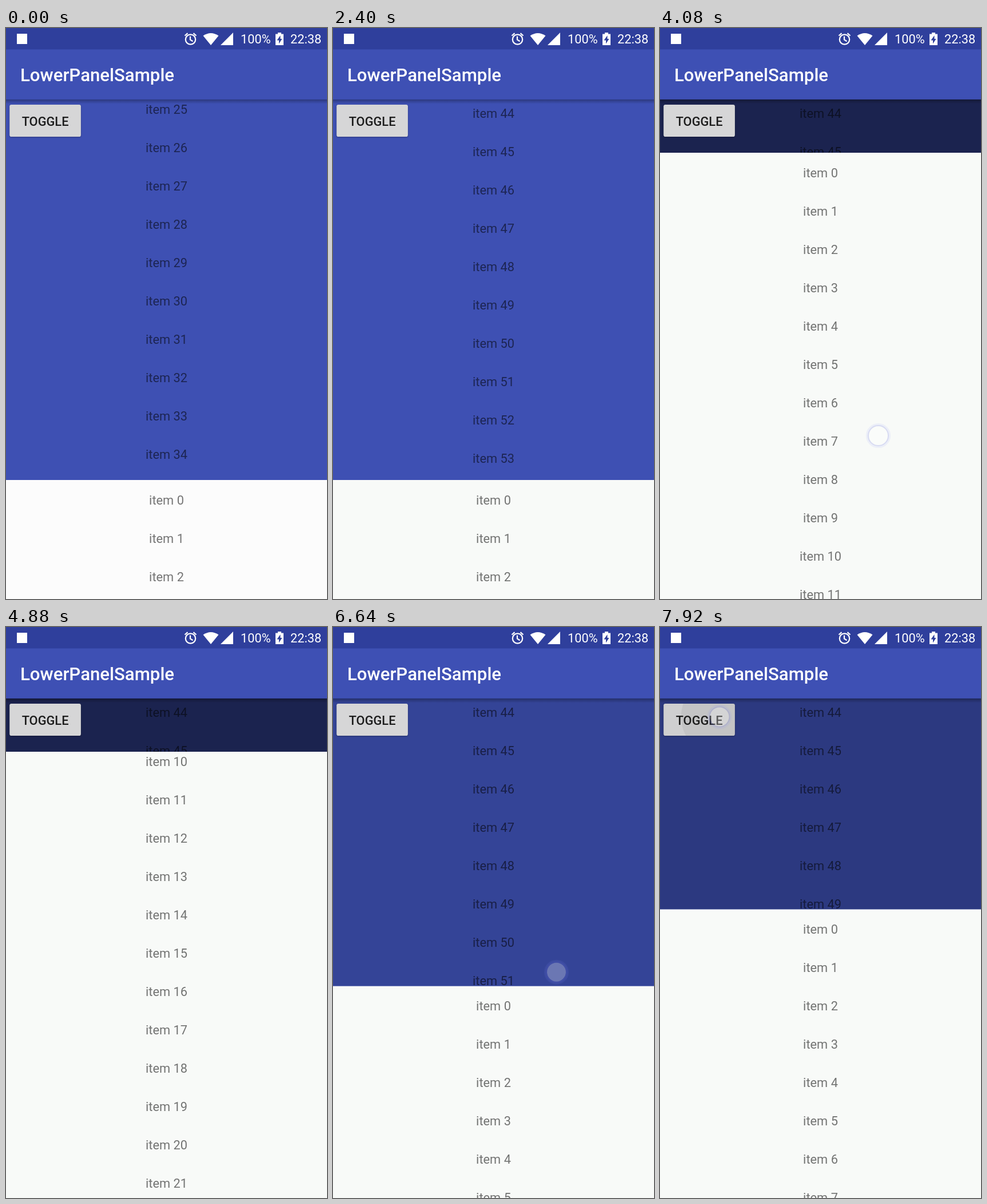
Animation of 561x998 px, one loop 8000 ms. Source, as an HTML page with a canvas:

```html
<!DOCTYPE html>
<html lang="en">
<head>
<meta charset="utf-8">
<title>Bottom drawer</title>
<style>
  html, body { margin: 0; height: 100%; overflow: hidden; }
  canvas { display: block; }
</style>
</head>
<body>
<canvas id="stage" width="561" height="998"></canvas>
<script>
const ctx = document.getElementById('stage').getContext('2d');
const W = 561, H = 998, LOOP = 8000, STEP = 80;
const DP = W / 360, TEXT = 14 * DP, ROW = 67;
const STATUS_BOTTOM = 24 * DP, BAR_BOTTOM = 80 * DP;
const CLOSED = 790, HALF = 493.5, OPEN = 218;
const TOGGLE_PRESS = 7760;

// Progress from 0 to 1 between two times; a power above 1 eases out.
function ease(t, start, end, power = 1) {
  const u = Math.min(1, Math.max(0, (t - start) / (end - start)));
  return 1 - (1 - u) ** power;
}

const pageScroll = t => 1265.6 * ease(t, 960, 2148, 2);

const listScroll = t => 700 * (ease(t, 4080, 5000, 2) - ease(t, 5502, 5920));

// Up to the half stop, on to the top, flung shut, and up to the half stop again.
const drawerTop = t => CLOSED
  + (HALF - CLOSED) * (ease(t, 2656, 3280) + ease(t, 6421, 6821))
  + (OPEN - HALF) * ease(t, 3440, 3920, 1.5)
  + (CLOSED - OPEN) * ease(t, 5920, 6200, 2);

function rect(x, y, w, h, color) {
  ctx.fillStyle = color;
  ctx.fillRect(x, y, w, h);
}

function circle(x, y, r, color, line) {
  ctx.beginPath();
  ctx.arc(x, y, r, 0, 2 * Math.PI);
  ctx.fillStyle = ctx.strokeStyle = color;
  ctx.lineWidth = line;
  if (line) ctx.stroke();
  else ctx.fill();
}

function shape(path, color) {
  ctx.fillStyle = color;
  ctx.fill(new Path2D(path));
}

function text(str, x, y, color, align = 'left', size = TEXT, weight = 400) {
  ctx.font = `${weight} ${size}px Roboto, sans-serif`;
  ctx.textAlign = align;
  ctx.fillStyle = color;
  ctx.fillText(str, x, y);
}

// Draws the rows of a list that show between top and bottom.
function rows(firstY, top, bottom) {
  ctx.save();
  ctx.beginPath();
  ctx.rect(0, top, W, bottom - top);
  ctx.clip();
  for (let n = Math.max(0, Math.floor((top - firstY) / ROW)); firstY + n * ROW < bottom + 20; n++)
    text(`item ${n}`, W / 2, Math.round(firstY + n * ROW) + 8, 'rgba(0,0,0,.54)', 'center');
  ctx.restore();
}

function statusBar() {
  rect(0, 0, W, STATUS_BOTTOM, '#2f3f9c');
  rect(19, 10, 18, 18, '#fff');
  circle(322.5, 20, 8.7, '#fff', 2.2);
  ctx.stroke(new Path2D('M312.5 13.5l5-4.3M332.5 13.5l-5-4.3M322 14.5v6l4.5 2.7'));
  shape('M344.5 13.5Q358 4.5 371.5 13.5L358 30Z', '#fff');
  shape('M375 30h22v-22z', '#fff');
  shape('M471 10.5h4V8h6v2.5h4V30h-14z', '#fff');
  shape('M479.5 13l-6 8.5h3.5v6l5.5-8.5h-3z', '#2f3f9c');
  text('100%', 410, 27, '#fff');
  text('22:38', 497, 27, '#fff');
}

function appBar() {
  const shade = ctx.createLinearGradient(0, BAR_BOTTOM, 0, BAR_BOTTOM + 8);
  shade.addColorStop(0, 'rgba(0,0,0,.3)');
  shade.addColorStop(1, 'rgba(0,0,0,0)');
  rect(0, BAR_BOTTOM, W, 8, shade);
  rect(0, STATUS_BOTTOM, W, BAR_BOTTOM - STATUS_BOTTOM, '#3e50b4');
  text('LowerPanelSample', 16 * DP, 93, '#fff', 'left', 20 * DP, 500);
}

function toggleButton(t) {
  const pressed = t >= TOGGLE_PRESS;
  ctx.save();
  ctx.beginPath();
  ctx.roundRect(4 * DP, BAR_BOTTOM + 6 * DP, 80 * DP, 36 * DP, 2 * DP);
  ctx.shadowColor = 'rgba(0,0,0,.3)';
  ctx.shadowBlur = 3;
  ctx.shadowOffsetY = 1;
  ctx.fillStyle = pressed ? '#cfcfd0' : '#d6d6d7';
  ctx.fill();
  ctx.shadowColor = 'transparent';
  ctx.clip();
  if (pressed) circle(104, 157, 22 + (t - TOGGLE_PRESS) * .283, 'rgba(0,0,0,.05)');
  ctx.restore();
  text('TOGGLE', 44 * DP, 170.5, '#1c1c1c', 'center', TEXT, 500);
}

function touch(t, start, end, x, y) {
  if (t < start || t > end + 100) return;
  ctx.globalAlpha = 1 - ease(t, end, end + 100);
  circle(x, y, 16.5, 'rgba(255,255,255,.27)');
  circle(x, y, 17.5, 'rgba(100,105,215,.18)', 2);
  circle(x, y, 19.5, 'rgba(130,140,240,.1)', 4);
  ctx.globalAlpha = 1;
}

// The finger moves along with whatever it drags.
function touches(t, top) {
  touch(t, 960, 1120, 392, 700 - pageScroll(t));
  touch(t, 2656, 3200, 415, top + 1.5);
  touch(t, 3440, 3800, 400, top);
  touch(t, 4080, 4320, 381.5, 712.5 - listScroll(t));
  touch(t, 5440, 5600, 388.5, 1004 - listScroll(t));
  touch(t, 6421, 6720, 390.5, top - 24.5);
  touch(t, TOGGLE_PRESS, LOOP, 104, 157);
}

function draw(t) {
  const top = drawerTop(t);
  const dim = .555 * (CLOSED - top) / (CLOSED - OPEN);
  rect(0, 0, W, H, '#3e50b3');
  rows(142 - 25 * ROW - pageScroll(t), BAR_BOTTOM, top);
  rect(0, BAR_BOTTOM, W, top - BAR_BOTTOM, `rgba(0,0,0,${dim})`);
  rect(0, top, W, H - top, t < 960 ? '#fcfcfc' : '#f8faf8');
  rows(top + 34.8 - listScroll(t), top, H);
  appBar();
  statusBar();
  toggleButton(t);
  touches(t, top);
}

function frame() {
  draw(Math.floor(performance.now() % LOOP / STEP) * STEP);
  requestAnimationFrame(frame);
}
frame();
</script>
</body>
</html>
```
